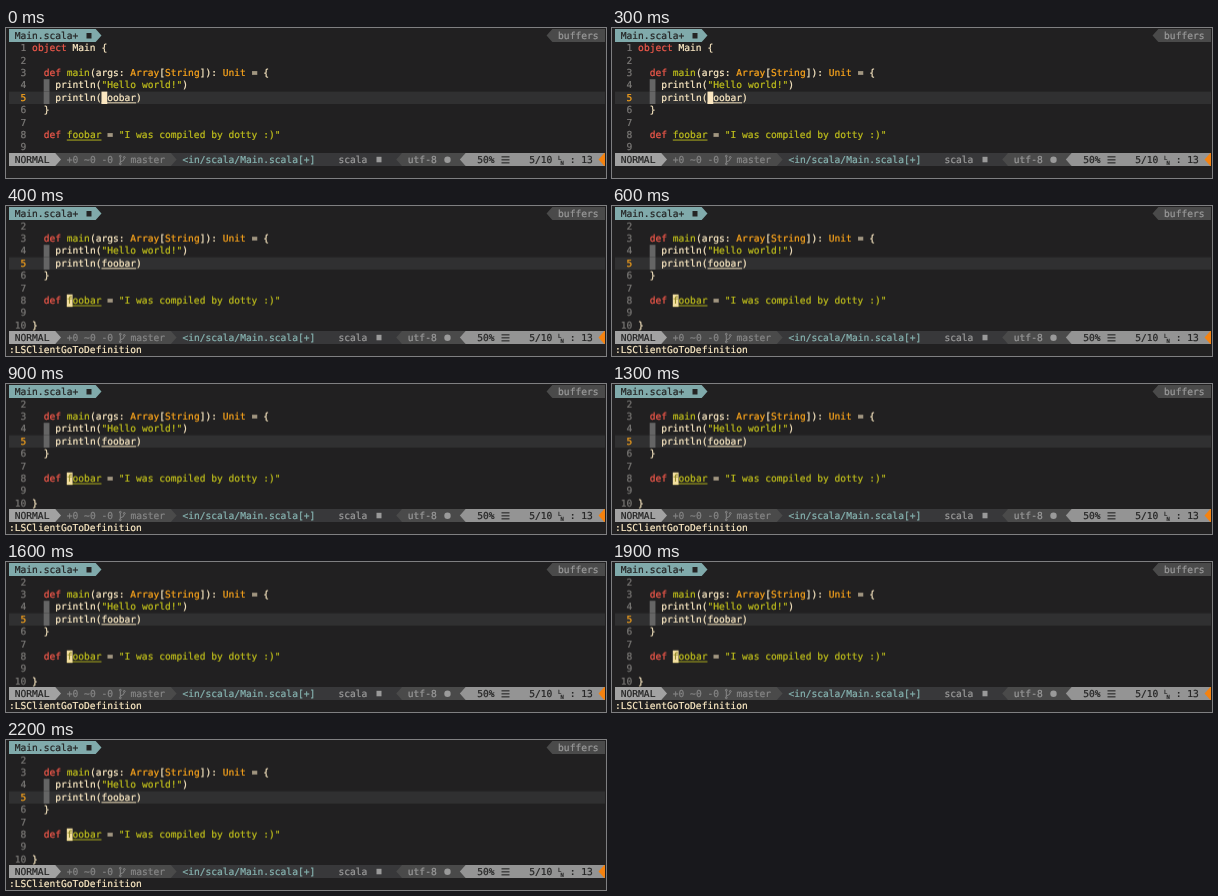
An HTML page for the animation above (2300 ms loop, 600 px wide and 150 px high).

```html
<!DOCTYPE html>
<html lang="en">
<head>
<meta charset="utf-8">
<title>Go to definition</title>
<style>
  html, body { margin: 0; width: 100%; height: 100%; overflow: hidden; background: #212021; }
  svg { display: block; }
  text {
    font: 9.6px "DejaVu Sans Mono", "Liberation Mono", monospace;
    white-space: pre;
    text-rendering: geometricPrecision;
  }
  /* A hairline stroke gives the text its slightly heavy weight. */
  text, tspan { fill: currentColor; stroke: currentColor; stroke-width: .22px; }
  svg { color: #fdebc5; }
  .key { color: #f2594b; }
  .type { color: #fda61c; }
  .str { color: #bfbe1c; }
  .num { color: #7c7a78; }
  .cur { color: #fda61c; }
  .dark { color: #242424; }
  .soft { color: #9a9a9a; }
  .dim { color: #868686; }
  .teal { color: #86b3b0; }
  .olive { color: #8f8724; }
  .tiny { font-size: 5.5px; }

  /* The jump happens 400 ms into the 2300 ms loop. */
  .scroll, .before, .after { animation: 2300ms step-end infinite; }
  .scroll { animation-name: scroll; }
  .before { animation-name: before; }
  .after { animation-name: after; }
  @keyframes scroll { 0% { transform: none; } 17.391%, 100% { transform: translateY(-12.4px); } }
  @keyframes before { 0% { opacity: 1; } 17.391%, 100% { opacity: 0; } }
  @keyframes after { 0% { opacity: 0; } 17.391%, 100% { opacity: 1; } }
</style>
</head>
<body>
<svg width="600" height="150" viewBox="0 0 600 150">
  <clipPath id="pane"><rect y="14" width="600" height="111"/></clipPath>
  <g clip-path="url(#pane)"><g id="code" class="scroll"></g></g>
  <g id="bars"></g>
</svg>
<script>
const CELL = 5.78, LINE = 12.4, LEFT = 3, TOP = 1.6, RIGHT = 599, BAR = 13;
const STATUS = 10, COMMAND = 11;
const INK = '#242424', LIGHT = '#949494', MODE = '#a2a2a2', PANEL = '#4a4a4a', MID = '#38383a', TEAL = '#80aaab';
const px = col => LEFT + col * CELL;
const py = row => TOP + row * LINE;
const barY = row => Math.floor(py(row));

const text = (col, row, body, cls = '') =>
  `<text x="${px(col)}" y="${py(row) + 9.2}" class="${cls}">${body}</text>`;
const rect = (x, y, w, h, fill, cls = '') =>
  `<rect x="${x}" y="${y}" width="${w}" height="${h}" fill="${fill}" class="${cls}"/>`;
const cells = (col, row, count, fill, cls) =>
  rect(px(col), py(row), count * CELL, LINE, fill, cls);
const underline = (col, row, count, fill) =>
  rect(px(col), py(row) + 10.8, count * CELL, 0.9, fill);
const span = (cls, body) => `<tspan class="${cls}">${body}</tspan>`;

// Bar segment from a straight edge to a pointed tip.
const segment = (edge, tip, row, fill) => {
  const y = barY(row), neck = tip + Math.sign(edge - tip) * CELL;
  return `<path fill="${fill}" d="M${edge} ${y}H${neck}L${tip} ${y + BAR / 2}L${neck} ${y + BAR}H${edge}z"/>`;
};
const segRight = (tip, row, fill) => segment(LEFT, px(tip), row, fill);
const segLeft = (tip, row, fill) => segment(RIGHT, px(tip), row, fill);

const key = s => span('key', s), type = s => span('type', s), str = s => span('str', s);
const lines = [
  [0, key('object') + ' Main {'],
  [0, ''],
  [2, `${key('def')} ${str('main')}(args: ${type('Array')}[${type('String')}]): ${type('Unit')} = {`],
  [4, `println(${str('"Hello world!"')})`],
  [4, 'println(foobar)'],
  [2, '}'],
  [0, ''],
  [2, `${key('def')} ${str('foobar')} = ${str('"I was compiled by dotty :)"')}`],
  [0, ''],
  [0, '}']
];

let code = rect(LEFT, py(5), RIGHT - LEFT, LINE, '#303031') +
  cells(6, 4, 1, '#656565') + cells(6, 5, 1, '#656565');
lines.forEach(([indent, body], i) => {
  const n = i + 1;
  code += text(0, n, String(n).padStart(3), n === 5 ? 'cur' : 'num') + text(4 + indent, n, body);
});
code += underline(16, 5, 6, '#fdebc5') + underline(10, 8, 6, '#bfbe1c') +
  cells(16, 5, 1, '#fae6c0', 'before') +
  `<g class="after">${cells(10, 8, 1, '#f3dfa0')}${text(10, 8, 'f', 'olive')}</g>`;
document.getElementById('code').innerHTML = code;

const mid = py(STATUS) + LINE / 2;
const fork = px(19) + 1.5;
const branch = `<g fill="none" stroke="#868686">
  <path d="M${fork} ${mid - 3}v6.5M${fork} ${mid + 2}q4 -.5 4 -3.5"/>
  <circle cx="${fork}" cy="${mid - 3.6}" r=".9"/>
  <circle cx="${fork}" cy="${mid + 4}" r=".9"/>
  <circle cx="${fork + 4}" cy="${mid - 2.4}" r=".9"/></g>`;
const menu = [-3, 0, 3].map(d => rect(495.5, mid + d - 0.5, 8, 1.1, INK)).join('');
const lineMark = `<text class="dark tiny" x="552" y="${mid}">L</text>
  <text class="dark tiny" x="554.5" y="${mid + 5}">N</text>`;

document.getElementById('bars').innerHTML =
  segRight(16, 0, TEAL) + text(1, 0, 'Main.scala+', 'dark') +
  rect(80.5, py(0) + 3.4, 5, 5.5, INK) +
  segLeft(93, 0, PANEL) + text(95, 0, 'buffers', 'soft') +

  rect(LEFT, barY(STATUS), RIGHT - LEFT, BAR, MID) +
  segRight(29, STATUS, PANEL) + segRight(9, STATUS, MODE) +
  text(1, STATUS, 'NORMAL', 'dark') +
  text(10, STATUS, '+0 ~0 -0', 'dim') + branch + text(21, STATUS, 'master', 'dim') +
  text(30, STATUS, '&lt;in/scala/Main.scala[+]', 'teal') +
  text(57, STATUS, 'scala', 'soft') + rect(370.5, mid - 3, 5, 5.5, '#9a9a9a') +
  segLeft(67, STATUS, PANEL) + text(69, STATUS, 'utf-8', 'soft') +
  `<circle cx="441.5" cy="${mid}" r="3.2" fill="#9a9a9a"/>` +
  segLeft(78, STATUS, LIGHT) +
  text(81, STATUS, '50%', 'dark') + menu + text(90, STATUS, '5/10', 'dark') + lineMark +
  text(97, STATUS, ': 13', 'dark') + segLeft(102, STATUS, '#f5820f') +
  `<g class="after">${text(0, COMMAND, ':LSClientGoToDefinition')}</g>`;
</script>
</body>
</html>
```
